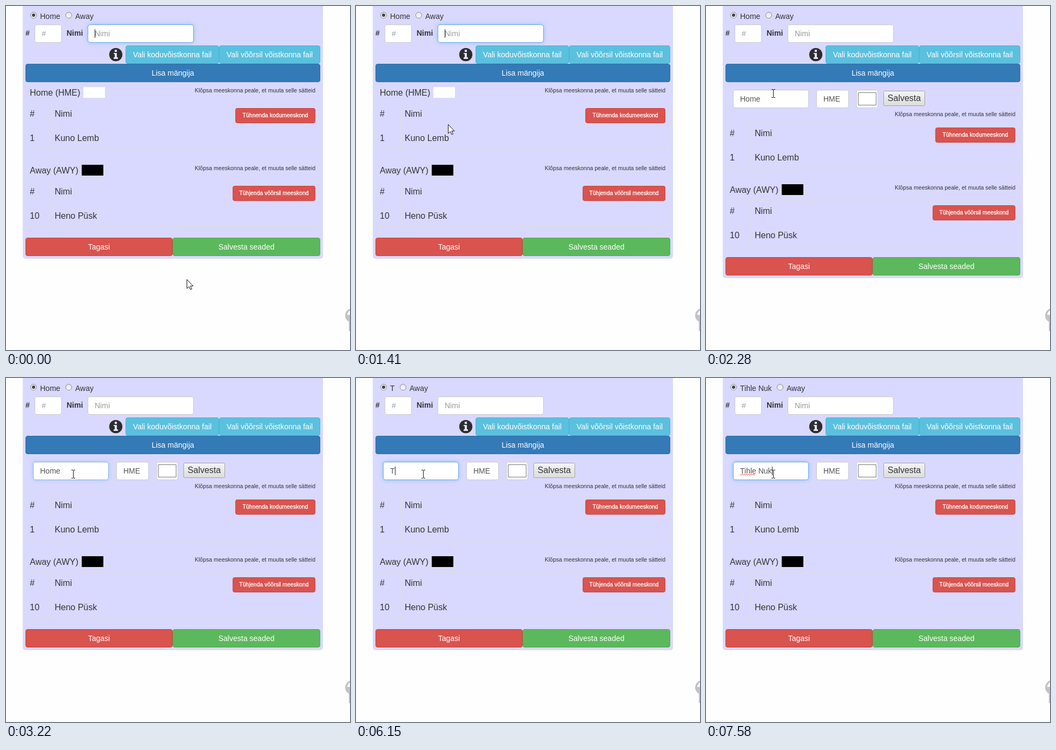
Recreate the animation shown at these times as an HTML page with a canvas. Size 636 px wide and 637 px high, loop 8 s.

```html
<!DOCTYPE html>
<html lang="et">
<head>
<meta charset="utf-8">
<title>Meeskonnad</title>
<style>
html, body { margin: 0; width: 100%; height: 100%; overflow: hidden; background: #fefefe; }
canvas { display: block; }
</style>
</head>
<body>
<canvas id="stage" width="636" height="637"></canvas>
<script>
const ctx = document.getElementById('stage').getContext('2d');
const LOOP = 8000;
const FACE = '"Liberation Sans", Arial, sans-serif';
const RED = ['#d9534f', '#d43f3a'];
const RED_HOVER = ['#c9302c', '#ac2925'];
const CYAN = ['#5bc0de', '#46b8da'];
const BLUE = ['#337ab7', '#2e6da4'];
const GREEN = ['#5cb85c', '#4cae4c'];
const TEAM = 'Tihle Nuk';
const KEY_TIMES = [6150, 6300, 6460, 6640, 6720, 6870, 7200, 7330, 7580];
const OPEN_AT = 2280;

// Pointer moves: start, end, step length, then points as [share, x, y]
const MOVES = [
  { from: 510, to: 1310, step: 80, path: [[0, 334, 506], [0.4, 266, 418], [0.72, 212, 306], [1, 180, 233]] },
  { from: 1331, to: 1960, step: 78.6, path: [[0, 180, 233], [0.4, 148, 189], [0.75, 128, 166], [1, 124, 162]] },
  { from: 2740, to: 3060, step: 80, path: [[0, 124, 162], [0.6, 124, 174], [1, 124, 178]] }
];

function rect(x, y, w, h, color) {
  ctx.fillStyle = color;
  ctx.fillRect(x, y, w, h);
}

function box(x, y, w, h, r, fill, line) {
  ctx.beginPath();
  ctx.roundRect(x + 0.5, y + 0.5, w - 1, h - 1, r);
  ctx.fillStyle = fill;
  ctx.fill();
  ctx.strokeStyle = line;
  ctx.lineWidth = 1;
  ctx.stroke();
}

function text(str, x, y, { size = 14, color = '#333', align = 'left', bold = false } = {}) {
  ctx.font = `${bold ? 'bold ' : ''}${size}px ${FACE}`;
  ctx.textAlign = align;
  ctx.fillStyle = color;
  ctx.fillText(str, x, y);
}

function widthOf(str) {
  ctx.font = `14px ${FACE}`;
  return ctx.measureText(str).width;
}

function button(str, x, y, w, [fill, line]) {
  box(x, y, w, 34, 3.5, fill, line);
  text(str, x + w / 2, y + 22, { color: '#fff', align: 'center' });
}

function smallButton(str, x, y) {
  const w = 572 - x;
  box(x, y, w, 28, 3, ...RED);
  text(str, x + w / 2, y + 17, { size: 10.5, color: '#fff', align: 'center' });
  ctx.strokeStyle = '#fff';
  ctx.lineWidth = 0.3;
  ctx.strokeText(str, x + w / 2, y + 17);
}

function input(x, y, w, str, color, focus = 0) {
  if (focus) {
    ctx.save();
    ctx.shadowColor = `rgba(102,175,233,${0.6 * focus})`;
    ctx.shadowBlur = 8;
    ctx.fillStyle = '#fff';
    ctx.beginPath();
    ctx.roundRect(x, y, w, 34, 4);
    ctx.fill();
    ctx.restore();
  }
  box(x, y, w, 34, 3.5, '#fff', '#ccc');
  rect(x + 3, y + 1, w - 6, 1, 'rgba(0,0,0,.06)');
  if (focus) {
    ctx.globalAlpha = focus;
    box(x, y, w, 34, 3.5, 'transparent', '#66afe9');
    ctx.globalAlpha = 1;
  }
  text(str, x + 13, y + 22, { color });
}

function disc(x, y, r, fill) {
  ctx.beginPath();
  ctx.arc(x, y, r, 0, Math.PI * 2);
  ctx.fillStyle = fill;
  ctx.fill();
}

function radio(x, on) {
  const shade = ctx.createLinearGradient(0, 11, 0, 23);
  shade.addColorStop(0, '#e4e4e4');
  shade.addColorStop(1, '#fafafa');
  disc(x, 17, 5.5, shade);
  ctx.strokeStyle = '#8c8c8c';
  ctx.lineWidth = 1;
  ctx.stroke();
  if (on) disc(x, 17, 3, '#444');
}

function infoIcon() {
  disc(203, 90, 12.2, '#2d2d2d');
  const c = '#e4e4ff';
  rect(201, 81, 4, 4, c);
  rect(199, 87, 6, 2, c);
  rect(201, 87, 4, 9, c);
  rect(199, 95, 8, 3, c);
}

function cornerIcon() {
  disc(640, 573, 13, '#c3c3c3');
  ctx.beginPath();
  ctx.arc(640, 572, 9, Math.PI, 0);
  ctx.fillStyle = '#fefefe';
  ctx.fill();
  rect(634, 584, 4, 18, '#c3c3c3');
}

// Player rows of one team, y is the line under its header
function players(y, num, name, label, x) {
  const line = '#dcdce2';
  rect(36, y, 545, 1, line);
  rect(36, y + 84, 545, 1, line);
  rect(82, y, 1, 85, line);
  rect(36, y - 39, 1, 124, line);
  rect(580, y - 39, 1, 124, line);
  const big = { size: 16 };
  text('#', 44, y + 25, big);
  text('Nimi', 90, y + 25, big);
  text(num, 44, y + 70, big);
  text(name, 90, y + 70, big);
  smallButton(label, x, y + 9);
}

function hint(y) {
  text('Klõpsa meeskonna peale, et muuta selle sätteid', 572, y, { size: 10.5, align: 'right' });
}

function typed(t) {
  if (t < 4730) return 'Home';
  return TEAM.slice(0, KEY_TIMES.filter(k => k <= t).length);
}

function homeCaretOn(t) {
  const off = [[0, 3300], [3840, 4400], [5190, 5740]];
  return !off.some(([a, b]) => t >= a && t < b);
}

function squiggle(x, w, y) {
  ctx.beginPath();
  for (let i = 0; i <= w; i += 2) ctx.lineTo(x + i, y + (i % 4 ? 1 : -1));
  ctx.strokeStyle = '#e33';
  ctx.lineWidth = 0.9;
  ctx.stroke();
}

function editor(t, name) {
  const focus = t < 3140 ? 0 : t < 3220 ? 0.3 : t < 3300 ? 0.7 : 1;
  input(50, 155, 140, name, '#555', focus);
  if (t >= 6870) squiggle(63, widthOf(name.split(' ')[0]), 179);
  if (homeCaretOn(t)) rect(Math.round(63 + widthOf(name)), 164, 1, 16, '#222');

  input(204, 155, 60, 'HME', '#555');
  input(278, 155, 40, '', '#555');
  box(281, 160, 34, 24, 0, '#fff', '#777');

  const shade = ctx.createLinearGradient(0, 157, 0, 185);
  shade.addColorStop(0, '#f4f4f4');
  shade.addColorStop(1, '#dcdcdc');
  box(328, 157, 77, 28, 1, shade, '#a3a3a3');
  text('Salvesta', 366.5, 176, { size: 16, align: 'center' });
}

function pointerAt(t) {
  const move = MOVES.filter(m => t >= m.from).pop() || MOVES[0];
  const steps = Math.max(0, Math.floor((t - move.from) / move.step + 0.01));
  const p = Math.min(1, steps * move.step / (move.to - move.from));
  const i = Math.max(1, move.path.findIndex(k => k[0] >= p - 0.001));
  const [a, b] = [move.path[i - 1], move.path[i]];
  const u = Math.min(1, (p - a[0]) / (b[0] - a[0]));
  return [1, 2].map(k => Math.round(a[k] + (b[k] - a[k]) * u));
}

function arrow(x, y) {
  const shape = [[0, 0], [0, 16.5], [4, 13], [6.5, 18.5], [9, 17.5], [6.5, 12], [11.5, 12]];
  ctx.beginPath();
  for (const [dx, dy] of shape) ctx.lineTo(x + 0.5 + dx, y + 0.5 + dy);
  ctx.closePath();
  ctx.fillStyle = '#fff';
  ctx.fill();
  ctx.strokeStyle = '#111';
  ctx.lineWidth = 1;
  ctx.stroke();
}

function beam(x, y) {
  for (const dy of [-8, 7]) {
    rect(x - 3, y + dy, 3, 1, '#111');
    rect(x + 1, y + dy, 3, 1, '#111');
  }
  rect(x, y - 7, 1, 14, '#111');
}

function draw(t) {
  const open = t >= OPEN_AT;
  const shift = open ? 36 : 0;
  const name = typed(t);
  const [mx, my] = pointerAt(t);

  rect(0, 0, 636, 637, '#fefefe');
  ctx.beginPath();
  ctx.roundRect(31, -10, 555, 478 + shift, 5);
  ctx.fillStyle = '#d9d9ff';
  ctx.fill();

  // Team choice follows the edited name
  const label = name.trimEnd();
  const end = 63 + widthOf(label);
  radio(51, true);
  text(label, 63, 24);
  radio(Math.round(end + 15.4), false);
  text('Away', Math.round(end + 27.4), 24);

  const nimiFocus = t < 2200 ? 1 : t < OPEN_AT ? 0.5 : 0;
  text('#', 36, 55, { bold: true });
  input(53, 34, 50, '#', '#999');
  text('Nimi', 112, 55, { bold: true });
  input(151, 34, 196, 'Nimi', '#999', nimiFocus);
  if (t < 590 || (t >= 1120 && t < 1650)) rect(164, 43, 1, 16, '#222');

  infoIcon();
  button('Vali koduvõistkonna fail', 221, 73, 173, CYAN);
  button('Vali võõrsil võistkonna fail', 394, 73, 187, CYAN);
  button('Lisa mängija', 36, 107, 545, BLUE);

  players(180 + shift, '1', 'Kuno Lemb', 'Tühnenda kodumeeskond', 424);
  if (open) {
    editor(t, name);
    hint(204);
  } else {
    text('Home (HME)', 44, 166, { size: 16 });
    rect(143, 150, 40, 20, '#fff');
    hint(160);
  }

  players(324 + shift, '10', 'Heno Püsk', 'Tühjenda võõrsil meeskond', 419);
  text('Away (AWY)', 44, 310 + shift, { size: 16 });
  rect(140, 294 + shift, 40, 20, '#000');
  hint(304 + shift);

  const bottom = 429 + shift;
  const over = mx >= 36 && mx < 308 && my >= bottom && my < bottom + 34;
  button('Tagasi', 36, bottom, 272, over ? RED_HOVER : RED);
  button('Salvesta seaded', 308, bottom, 273, GREEN);

  cornerIcon();
  const onText = mx < 140 && my > 148 && my < 190;
  (onText ? beam : arrow)(mx, my);
}

function tick() {
  draw(performance.now() % LOOP);
  requestAnimationFrame(tick);
}
tick();
</script>
</body>
</html>
```
